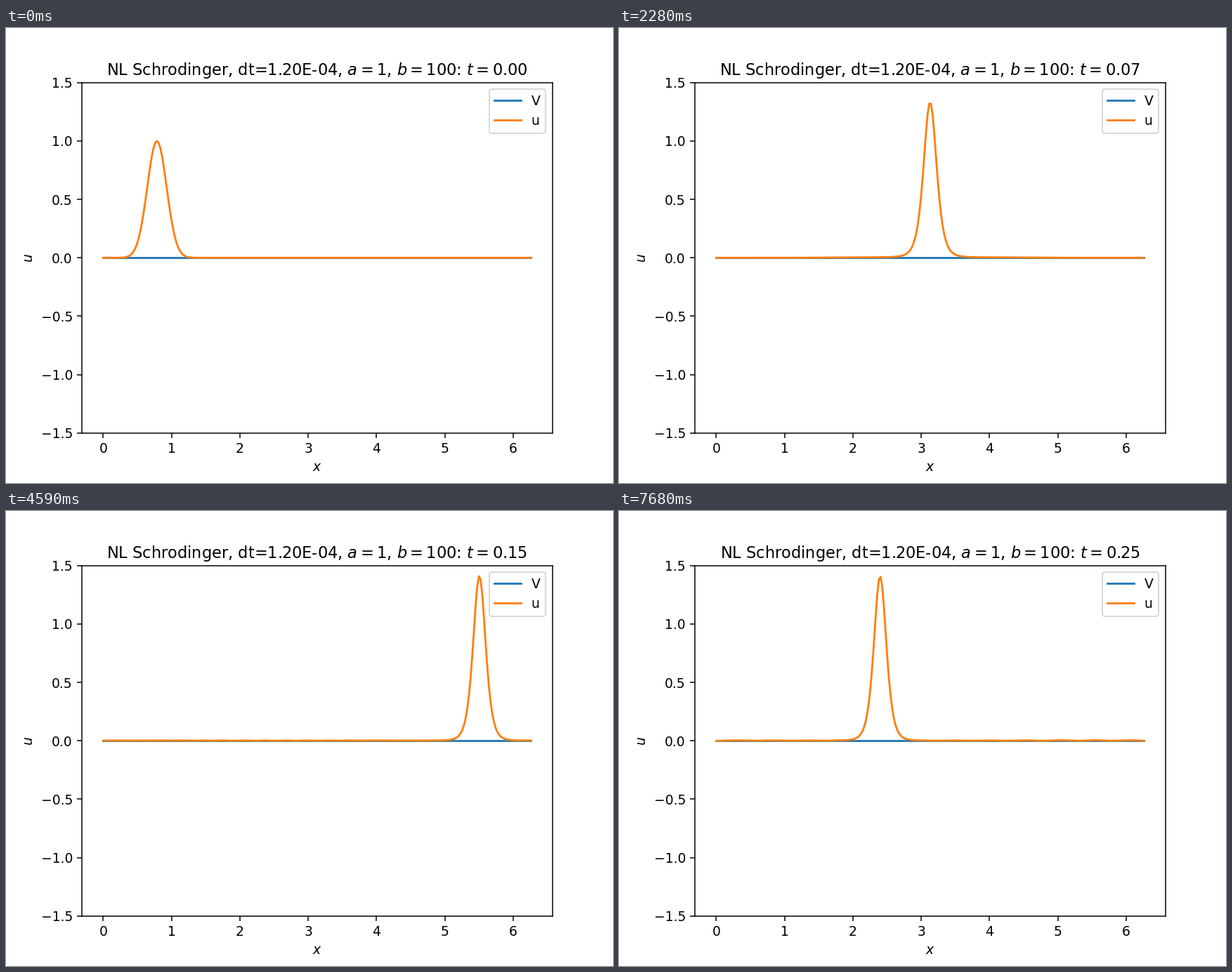
Animation, 864 px wide and 648 px high, one loop 7.71 s. Source, as a matplotlib script:

```python
import numpy as np
import matplotlib.pyplot as plt
from matplotlib.animation import FuncAnimation

# Focusing nonlinear wave on a periodic domain:
#   i u_t + a u_xx + b |u|^2 u = 0,  solved by Strang splitting.
A, B = 1, 100
N = 256
FRAMES = 257
STEPS_PER_FRAME = 8
INTERVAL = 30

dx = 2 * np.pi / N
dt = 0.2 * dx**2
x = dx * np.arange(N)
k = np.fft.fftfreq(N, 1 / N)
linear = np.exp(-1j * A * k**2 * dt)


def kick(u):
    """Half a step of the nonlinear term."""
    return u * np.exp(0.5j * dt * B * np.abs(u)**2)


def step(u):
    return kick(np.fft.ifft(linear * np.fft.fft(kick(u))))


def solve():
    """Density |u|^2 for every frame."""
    u = np.exp(-0.5 * ((x - np.pi / 4) / 0.2)**2 + 16j * x)
    density = [np.abs(u)**2]
    for _ in range(FRAMES - 1):
        for _ in range(STEPS_PER_FRAME):
            u = step(u)
        density.append(np.abs(u)**2)
    return density


def title_text(t):
    return f"NL Schrodinger, dt={dt:.2E}, $a={A}$, $b={B}$: $t={t:.2f}$"


density = solve()

plt.rcParams["font.family"] = "DejaVu Sans"
fig, ax = plt.subplots(figsize=(6.4, 4.8), dpi=135)
ax.plot(x, np.zeros(N), label="V")
wave, = ax.plot(x, density[0], label="u")
ax.set_ylim(-1.5, 1.5)
ax.set_xlabel("$x$")
ax.set_ylabel("$u$")
ax.legend(loc="upper right")
title = ax.set_title(title_text(0))


def update(i):
    wave.set_ydata(density[i])
    title.set_text(title_text(i * STEPS_PER_FRAME * dt))
    return wave, title


anim = FuncAnimation(fig, update, frames=FRAMES, interval=INTERVAL,
                     repeat=True, repeat_delay=0, blit=False)
plt.show()
```
